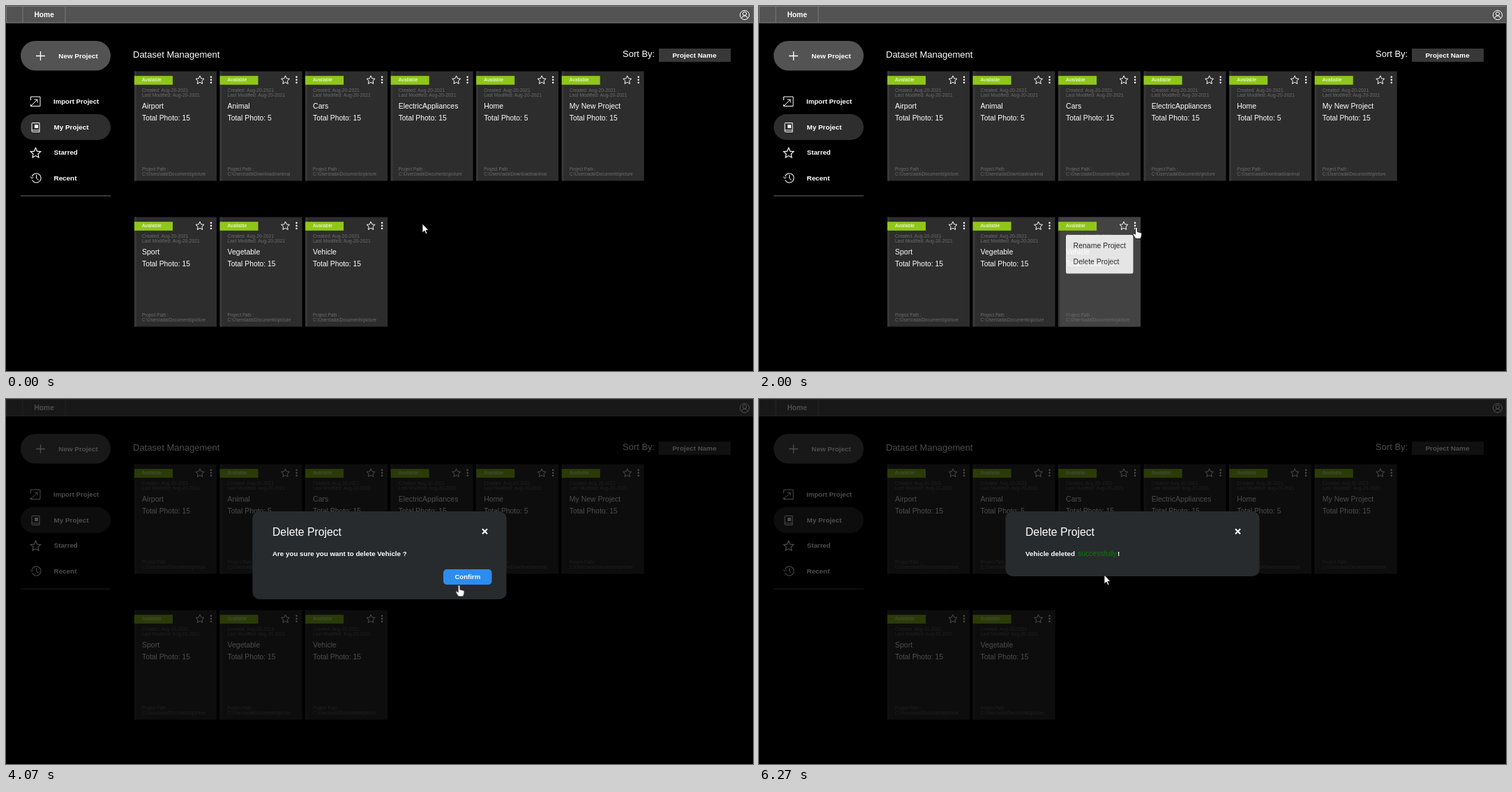
Recreate the animation shown at these times as an HTML page. Size 1071 by 523 pixels, loop 7070 ms.

```html
<!DOCTYPE html>
<html lang="en">
<head>
<meta charset="utf-8">
<title>Dataset Management</title>
<style>
html, body { margin: 0; width: 100%; height: 100%; overflow: hidden; background: #000; }
svg { display: block; width: 1071px; height: 523px; }
text { font-family: "Liberation Sans", Arial, sans-serif; fill: #fff; white-space: pre; }
.bold { font-weight: bold; font-size: 9.9px; }
.head { font-size: 13px; }
.name { font-size: 10.5px; }
.total { font-size: 10.35px; }
.date { font-size: 6.78px; fill: #6c6c6c; }
.path { font-size: 6.3px; fill: #6c6c6c; }
.tag { font-size: 6.9px; }
.option { font-size: 10.5px; fill: #222; }
.line { fill: none; stroke: #fff; stroke-width: 1; }

#cards, #vehicle, #hover, #menu, #row, #modal, #ask, #done, #arrow, #hand, #cursor {
  animation: 7.07s infinite step-end;
}
#cards { animation-name: refresh; animation-timing-function: linear; }
#vehicle { animation-name: removed; }
#hover { animation-name: hover; }
#menu { animation-name: menu; animation-timing-function: linear; }
#row { animation-name: row; }
#modal { animation-name: modal; }
#ask { animation-name: removed; }
#done { animation-name: done; }
#arrow { animation-name: arrow; }
#hand { animation-name: hand; }
#cursor { animation-name: move; animation-timing-function: ease-in-out; }

@keyframes refresh {
  0%, 61.17% { opacity: 1; }
  61.18% { opacity: 0; }
  85.5%, 100% { opacity: 1; }
}
@keyframes removed { 0% { opacity: 1; } 61.17%, 100% { opacity: 0; } }
@keyframes done { 0% { opacity: 0; } 61.17%, 100% { opacity: 1; } }
@keyframes hover { 0% { opacity: 0; } 17.4% { opacity: 1; } 43.35%, 100% { opacity: 0; } }
@keyframes menu {
  0%, 24.26% { opacity: 0; transform: translateY(-8px); }
  28.93%, 43.34% { opacity: 1; transform: none; }
  43.35%, 100% { opacity: 0; transform: none; }
}
@keyframes row { 0% { opacity: 0; } 33.8%, 100% { opacity: 1; } }
@keyframes modal { 0% { opacity: 0; } 43.35%, 100% { opacity: 1; } }
@keyframes hand {
  0% { opacity: 0; }
  17.8% { opacity: 1; }
  30.55% { opacity: 0; }
  56.4% { opacity: 1; }
  61.17%, 100% { opacity: 0; }
}
@keyframes arrow {
  0% { opacity: 1; }
  17.8% { opacity: 0; }
  30.55% { opacity: 1; }
  56.4% { opacity: 0; }
  61.17%, 100% { opacity: 1; }
}
@keyframes move {
  0%, 9.76% { transform: translate(597px, 312px); }
  19.8%, 24.3% { transform: translate(541.5px, 316px); }
  29.14% { transform: translate(541px, 317px); }
  33.95%, 34.4% { transform: translate(519px, 358px); }
  36.78%, 46.53% { transform: translate(513px, 370px); }
  56.58% { transform: translate(647px, 267px); }
  57.5% { transform: translate(649.5px, 266.5px); }
  60.4%, 80.62% { transform: translate(654px, 261px); }
  88.54%, 100% { transform: translate(495px, 252px); }
}
</style>
</head>
<body>
<svg viewBox="0 0 1071 523">
  <defs>
    <path id="star" class="line" d="M0-6 1.8-2 6-1.6 2.9 1.3 3.7 5.5 0 3.4-3.7 5.5-2.9 1.3-6-1.6-1.8-2z"/>
  </defs>
  <rect width="1071" height="523"/>

  <!-- Top bar -->
  <rect width="1071" height="24.5" fill="#535353"/>
  <path d="M0 .5H1071M0 24H1071M.5 0V24M24 0V24M85 0V24" fill="none" stroke="#787878"/>
  <text class="bold" x="40.5" y="15.6" style="font-size:10.2px">Home</text>
  <g class="line">
    <circle cx="1059" cy="13" r="6.6"/>
    <circle cx="1059" cy="11" r="2.6"/>
    <path d="M1054.6 17.8q.6-3.6 4.4-3.8 3.8.2 4.4 3.8"/>
  </g>

  <!-- Sidebar -->
  <rect x="21" y="50" width="129" height="42.5" rx="21.2" fill="#535353"/>
  <rect x="21" y="155" width="129" height="37" rx="18.5" fill="#2e2e2e"/>
  <g class="line">
    <path d="M43 71.5H56M49.5 65V78" stroke-width="1.3"/>
    <path d="M35.5 135V130H49V143.5H35.5V141M35 144 45 134M40.5 134H45V138.500"/>
    <path d="M38 167.500H48V180.500H38.500Q37 180.500 37 179V168.500Q37 167.500 38 167.500M37 178H48"/>
    <path d="M36 189" />
    <circle cx="43.500" cy="246.500" r="6.600" stroke-dasharray="36 5.500" transform="rotate(-160 43.500 246.500)"/>
    <path d="M43.500 242V247L46.500 249.500M35 244.500 37 247 39.500 245"/>
  </g>
  <path d="M41 170H46V175H41z" fill="#fff"/>
  <use href="#star" transform="translate(42.500 210.500) scale(1.2)"/>
  <text class="bold" x="75.3" y="75">New Project</text>
  <text class="bold" x="68" y="140" style="font-size:9.650px">Import Project</text>
  <text class="bold" x="68.5" y="177">My Project</text>
  <text class="bold" x="68.7" y="213.3" style="font-size:9.750px">Starred</text>
  <text class="bold" x="68.5" y="250">Recent</text>
  <path d="M21 272H150" stroke="#6a6a6a"/>

  <!-- Heading -->
  <text class="head" x="182" y="74.300">Dataset Management</text>
  <text class="head" x="884" y="73">Sort By:</text>
  <rect x="936" y="61" width="103" height="19" fill="#383838"/>
  <text class="bold" x="955.500" y="73.700">Project Name</text>

  <g id="cards"></g>

  <!-- Card menu -->
  <g id="menu">
    <rect x="440" y="329" width="96.500" height="55.500" rx="2.500" fill="#fff"/>
    <rect id="row" x="445" y="356" width="86.500" height="23" fill="#e8e8e8"/>
    <text class="option" x="450.600" y="348">Rename Project</text>
    <text class="option" x="450.600" y="371">Delete Project</text>
  </g>

  <!-- Dialog -->
  <g id="modal">
    <rect width="1071" height="523" opacity=".7"/>
    <rect x="353.500" y="161" width="364" height="93" rx="10" fill="#272b2e"/>
    <g id="ask">
      <rect x="353.500" y="161" width="364" height="126" rx="10" fill="#272b2e"/>
      <text class="bold" x="382" y="225" style="font-size:9.780px">Are you sure you want to delete Vehicle ?</text>
      <rect x="627" y="244" width="69.500" height="22" rx="5" fill="#2d8cf0"/>
      <text class="bold" x="643.400" y="258" style="font-size:9.600px">Confirm</text>
    </g>
    <g id="done">
      <text class="bold" x="382" y="225" style="font-size:9.820px">Vehicle deleted</text>
      <text x="457" y="225" style="font-size:10.400px;fill:#0a7d0a">successfully</text>
      <text class="bold" x="514" y="225">!</text>
    </g>
    <text x="382" y="196" style="font-size:15.760px">Delete Project</text>
    <path class="line" d="M683 186.300 690 193.300M690 186.300 683 193.300" stroke-width="2" style="stroke-width:2"/>
  </g>

  <g id="cursor" fill="#fff" stroke="#000" stroke-width=".8">
    <path id="arrow" d="M0 0V13L3 10.200 5 14.600 7 13.700 5 9.400H9z"/>
    <path id="hand" d="M-1.400 1.400a1.400 1.400 0 0 1 2.800 0V6.500l4.800 1.200q1.600.5 1.500 2.200l-.7 4-1.300 2.600H-1L-4.700 10.500q-.6-1.600.8-1.900L-1.400 10.300z"/>
  </g>
</svg>
<script>
const names = ["Airport", "Animal", "Cars", "ElectricAppliances", "Home",
  "My New Project", "Sport", "Vegetable", "Vehicle"];
const downloads = ["Animal", "Home"];

const label = (kind, y, value) => `<text class="${kind}" x="11" y="${y}">${value}</text>`;

function card(name, i) {
  const x = 184 + 122.55 * (i % 6);
  const y = i < 6 ? 93.5 : 302.5;
  const small = downloads.includes(name);
  const folder = small ? "Downloads\\animal" : "Documents\\picture";
  const last = name === "Vehicle";
  const dots = [8.3, 12.3, 16.3].map(cy => `<circle cx="110" cy="${cy}" r="1.25" fill="#fff"/>`).join("");
  return `<g ${last ? 'id="vehicle"' : ""}><g transform="translate(${x} ${y})">
    <rect width="118" height="157" fill="#2d2d2d"/>
    ${last ? '<rect id="hover" width="118" height="157" fill="#434343"/>' : ""}
    <rect width="3" height="157" fill="#383838"/>
    <rect y="6.7" width="55" height="12.6" fill="#8fc719"/>
    ${label("tag", 14.8, "Available")}
    <use href="#star" x="94" y="12.4"/>${dots}
    ${label("date", 29, "Created: Aug-20-2021")}
    ${label("date", 36.8, "Last Modified: Aug-20-2021")}
    ${label("name", 53.2, name)}
    ${label("total", 70.2, "Total Photo: " + (small ? 5 : 15))}
    ${label("path", 142.8, "Project Path :")}
    ${label("path", 149.5, "C:\\Users\\ada\\" + folder)}
  </g></g>`;
}

document.getElementById("cards").innerHTML = names.map(card).join("");
</script>
</body>
</html>
```
